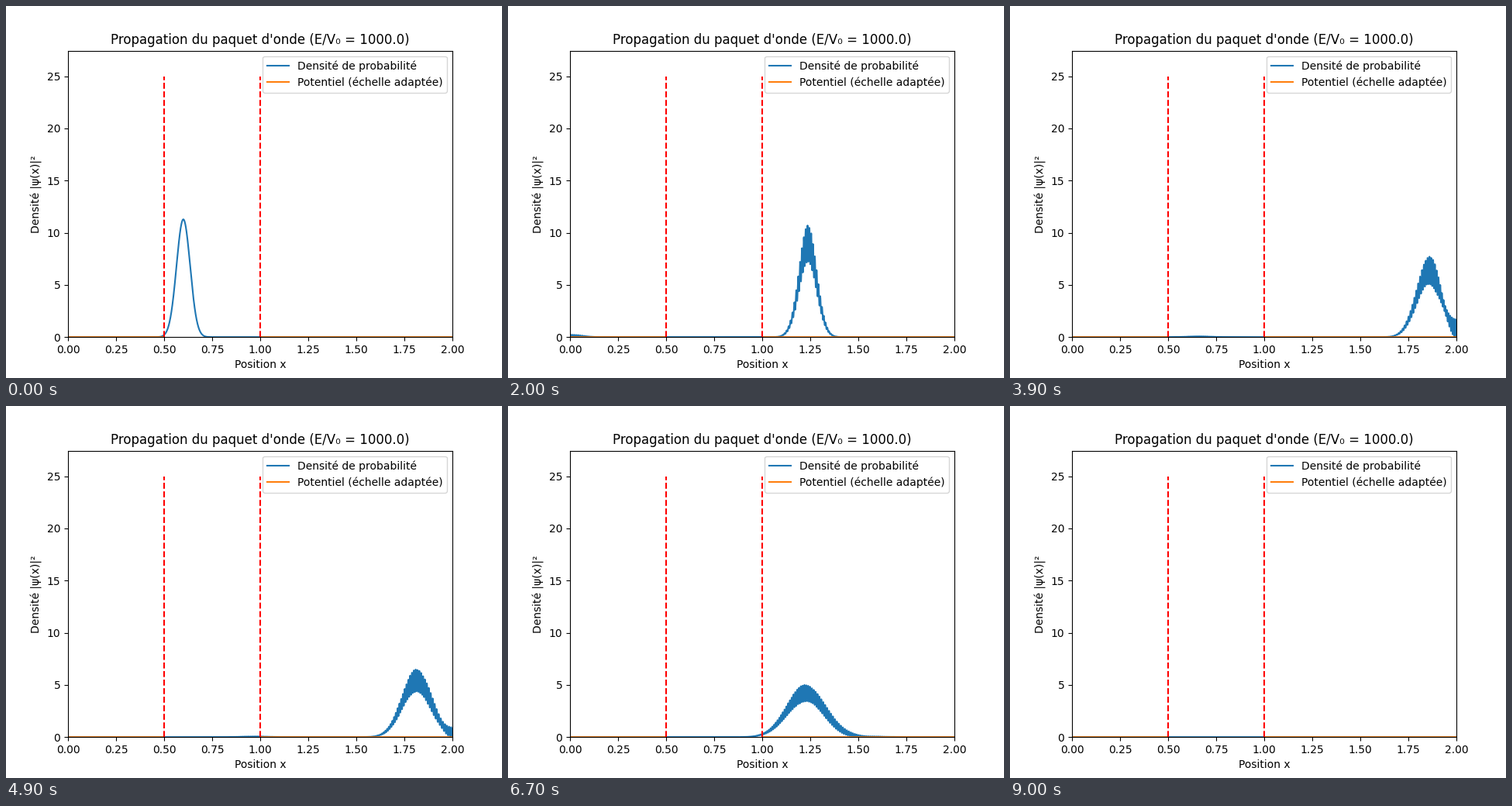
Recreate the animation shown at these times as a matplotlib script. Size 640 px wide and 480 px high, loop 9100 ms.

```python
import math

import numpy as np
import matplotlib.pyplot as plt
from matplotlib.animation import FuncAnimation

# Grid and time step
DX, DT = 0.001, 1e-7
NX, NT = 2000, 90000
STEPS = 1000                      # time steps per picture
FRAMES = NT // STEPS + 1
S = DT / DX**2

# Potential well and wave packet
LEFT, RIGHT = 0.5, 1.0
V0, RATIO = -4000, 1000.0
CENTRE, SIGMA = 0.6, 0.05


def simulate(x, v):
    """Leapfrog Schrödinger solver; returns |psi|² for every picture."""
    amp = 1 / math.sqrt(SIGMA * math.sqrt(math.pi))
    k = math.sqrt(2 * abs(RATIO * V0))
    psi = amp * np.exp(1j * k * x - (x - CENTRE)**2 / (2 * SIGMA**2))
    re, im = psi.real.copy(), psi.imag.copy()
    diag = 2 * (S + v[1:-1] * DT)

    density = np.zeros((FRAMES, NX))   # the last picture stays empty
    density[0] = np.abs(psi)**2
    for i in range(1, NT):
        if i % 2:
            im[1:-1] += S * (re[2:] + re[:-2]) - diag * re[1:-1]
        else:
            re[1:-1] -= S * (im[2:] + im[:-2]) - diag * im[1:-1]
        if i % STEPS == 0:
            density[i // STEPS, 1:-1] = re[1:-1]**2 + im[1:-1]**2
    return density


x = np.linspace(0, (NX - 1) * DX, NX)
v = np.where((x >= LEFT) & (x <= RIGHT), float(V0), 0.0)
density = simulate(x, v)
peak = density.max()

plt.rcParams["font.family"] = "DejaVu Sans"
fig, ax = plt.subplots(figsize=(6.4, 4.8), dpi=100)
curve, = ax.plot(x, density[0], label="Densité de probabilité")
ax.plot(x, v / abs(V0) * peak, label="Potentiel (échelle adaptée)")
for edge in (LEFT, RIGHT):
    ax.plot([edge, edge], [0, peak], "r--")

ax.set_xlim(0, 2)
ax.set_ylim(0, 1.1 * peak)
ax.set_title(f"Propagation du paquet d'onde (E/V₀ = {RATIO})")
ax.set_xlabel("Position x")
ax.set_ylabel("Densité |ψ(x)|²")
ax.legend(loc="upper right")


def update(n):
    curve.set_ydata(density[n])
    return curve,


anim = FuncAnimation(fig, update, frames=FRAMES, interval=100,
                     repeat=True, repeat_delay=0)
plt.show()
```
